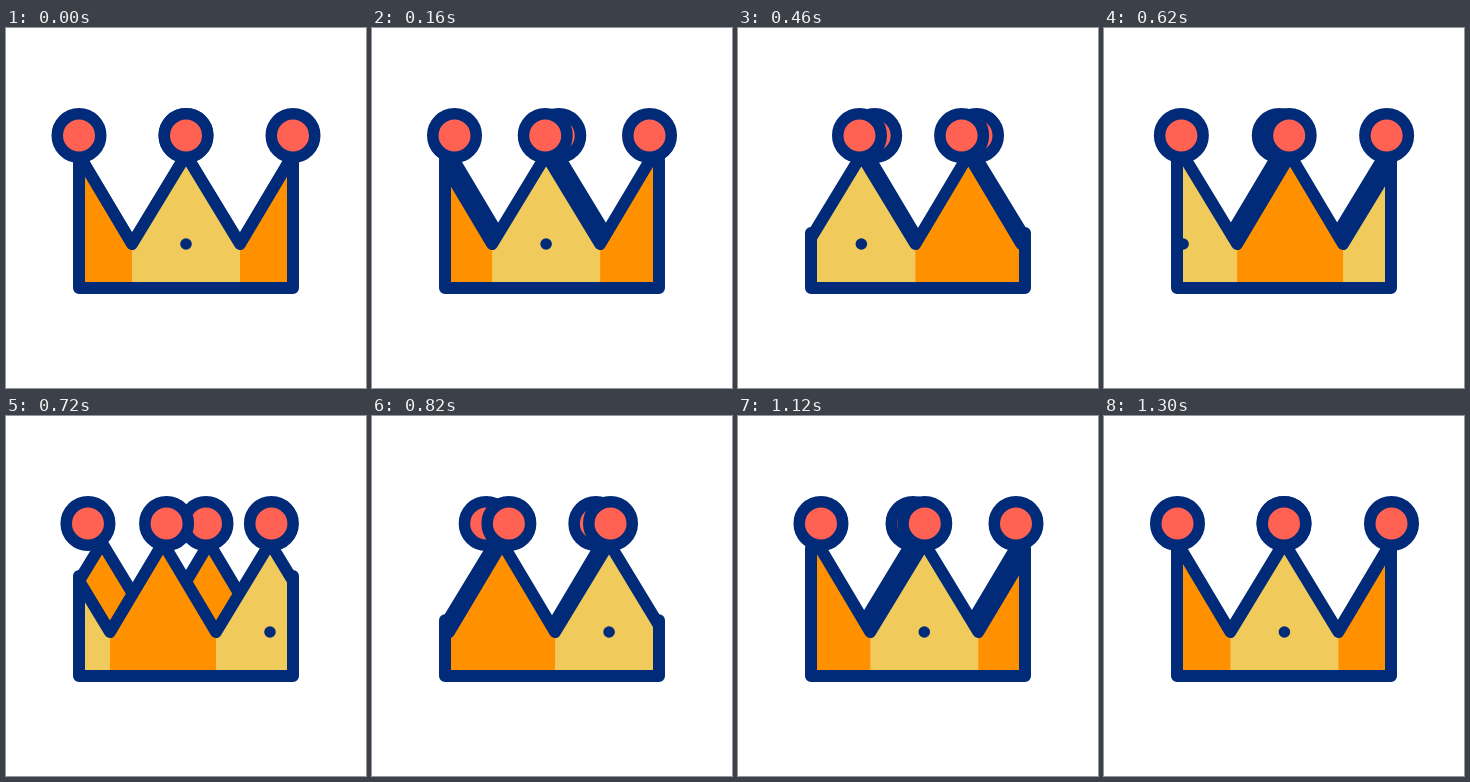
These frames come from a looping animation (360 px wide and 360 px high, 1420 ms). An HTML page:

```html
<!DOCTYPE html>
<html lang="en">
<head>
<meta charset="utf-8">
<title>Spinning crown</title>
<style>
  html, body { margin: 0; width: 100%; height: 100%; overflow: hidden; background: #fff; }
  svg { display: block; width: 100vw; height: 100vh; }
  .line { fill: none; stroke: #012a78; stroke-width: 12; stroke-linecap: round; stroke-linejoin: round; }
  .ball { fill: #ff6153; stroke: #012a78; stroke-width: 11.5; }
</style>
</head>
<body>
<svg viewBox="0 0 360 360">
  <defs>
    <clipPath id="inside"><rect x="73" y="60" width="214" height="200"/></clipPath>
    <clipPath id="shape"><path id="frontClip"/></clipPath>
  </defs>
  <path id="backFill" fill="#ff9100"/>
  <path id="backLine" class="line"/>
  <path id="frontFill" fill="#ff9100"/>
  <g clip-path="url(#shape)" fill="#f0cb5c">
    <rect id="tileA" y="100" width="108" height="160"/>
    <rect id="tileB" y="100" width="108" height="160"/>
  </g>
  <g clip-path="url(#inside)" fill="#012a78">
    <circle id="dotA" cy="216" r="5.8"/>
    <circle id="dotB" cy="216" r="5.8"/>
  </g>
  <path id="frontLine" class="line"/>
  <path id="walls" class="line"/>
  <g id="backBalls"></g>
  <g id="frontBalls"></g>
</svg>
<script>
const LEFT = 73, RIGHT = 287, MID = 180, BASE = 260;
const PEAK = 127, VALLEY = 216, TURN = 214;
const LOOP = 1420, SPIN = 1280, LAST = 1300, STEP = 20;
const $ = id => document.getElementById(id);
const set = (el, attrs) => { for (const k in attrs) el.setAttribute(k, attrs[k]); };

function bezier(x1, y1, x2, y2) {
  const at = (s, a, b) => 3 * a * s * (1 - s) ** 2 + 3 * b * s * s * (1 - s) + s ** 3;
  return x => {
    if (x <= 0) return 0;
    if (x >= 1) return 1;
    let lo = 0, hi = 1;
    for (let i = 0; i < 30; i++) {
      const m = (lo + hi) / 2;
      if (at(m, x1, x2) < x) lo = m; else hi = m;
    }
    return at(lo, y1, y2);
  };
}
const easeBody = bezier(.42, 0, .58, 1);
const easeBall = bezier(.325, 0, .675, 1);
const easeReturn = bezier(.3, .04, .28, 1);

// Rim points between the walls, for a zigzag shifted sideways by dx.
function rim(dx) {
  const knots = [];
  for (let k = -2; k <= 2; k++) {
    const x = dx + k * TURN;
    knots.push([x + 73, PEAK], [x + 126, VALLEY], [x + 180, PEAK], [x + 234, VALLEY]);
  }
  const height = x => {
    const i = knots.findIndex(p => p[0] > x);
    const [ax, ay] = knots[i - 1], [bx, by] = knots[i];
    return ay + (by - ay) * (x - ax) / (bx - ax);
  };
  return [
    [LEFT, height(LEFT)],
    ...knots.filter(p => p[0] > LEFT && p[0] < RIGHT),
    [RIGHT, height(RIGHT)]
  ];
}
const path = pts => 'M' + pts.map(p => p[0].toFixed(2) + ' ' + p[1].toFixed(2)).join('L');
const closed = pts => path([...pts, [RIGHT, BASE], [LEFT, BASE]]) + 'Z';

function makeBalls(id) {
  return [0, 1].map(() => {
    const c = document.createElementNS('http://www.w3.org/2000/svg', 'circle');
    set(c, { class: 'ball', cy: 107.5, r: 21.75 });
    return $(id).appendChild(c);
  });
}
const backBalls = makeBalls('backBalls'), frontBalls = makeBalls('frontBalls');
const placeBalls = (balls, xs) => balls.forEach((b, i) => set(b, { cx: xs[i].toFixed(2) }));

// Distance of the middle ball from the centre as it leaves.
const leave = t => Math.min(107, TURN * easeBody(t / 1270));

function draw(t) {
  const shift = 213.6 * easeBody((t - 12) / (SPIN - 24));
  const front = rim(-shift), back = rim(shift);
  set($('backFill'), { d: closed(back) });
  set($('backLine'), { d: path(back) });
  set($('frontFill'), { d: closed(front) });
  set($('frontClip'), { d: closed(front) });
  set($('frontLine'), { d: path(front) });
  set($('tileA'), { x: 126 - shift });
  set($('tileB'), { x: 126 - shift + TURN });
  set($('dotA'), { cx: MID - shift });
  set($('dotB'), { cx: MID - shift + TURN });

  const top = i => Math.min(front.at(i)[1], back.at(i)[1]) - 5;
  set($('walls'), { d: path([[LEFT, top(0)], [LEFT, BASE], [RIGHT, BASE], [RIGHT, top(-1)]]) });

  const half = SPIN / 2, first = t < half;
  const across = easeBall(t / SPIN);
  placeBalls(frontBalls, [
    first ? MID - leave(t) : MID + leave(SPIN - t),
    RIGHT - 213.5 * across
  ]);
  placeBalls(backBalls, [
    first ? MID + leave(t) : LEFT + 107 * easeReturn((t - half) / half),
    LEFT + 214.5 * across
  ]);
}

const start = performance.now();
function tick() {
  const t = (performance.now() - start) % LOOP;
  draw(Math.min(LAST, Math.floor(t / STEP) * STEP));
  requestAnimationFrame(tick);
}
tick();
</script>
</body>
</html>
```
